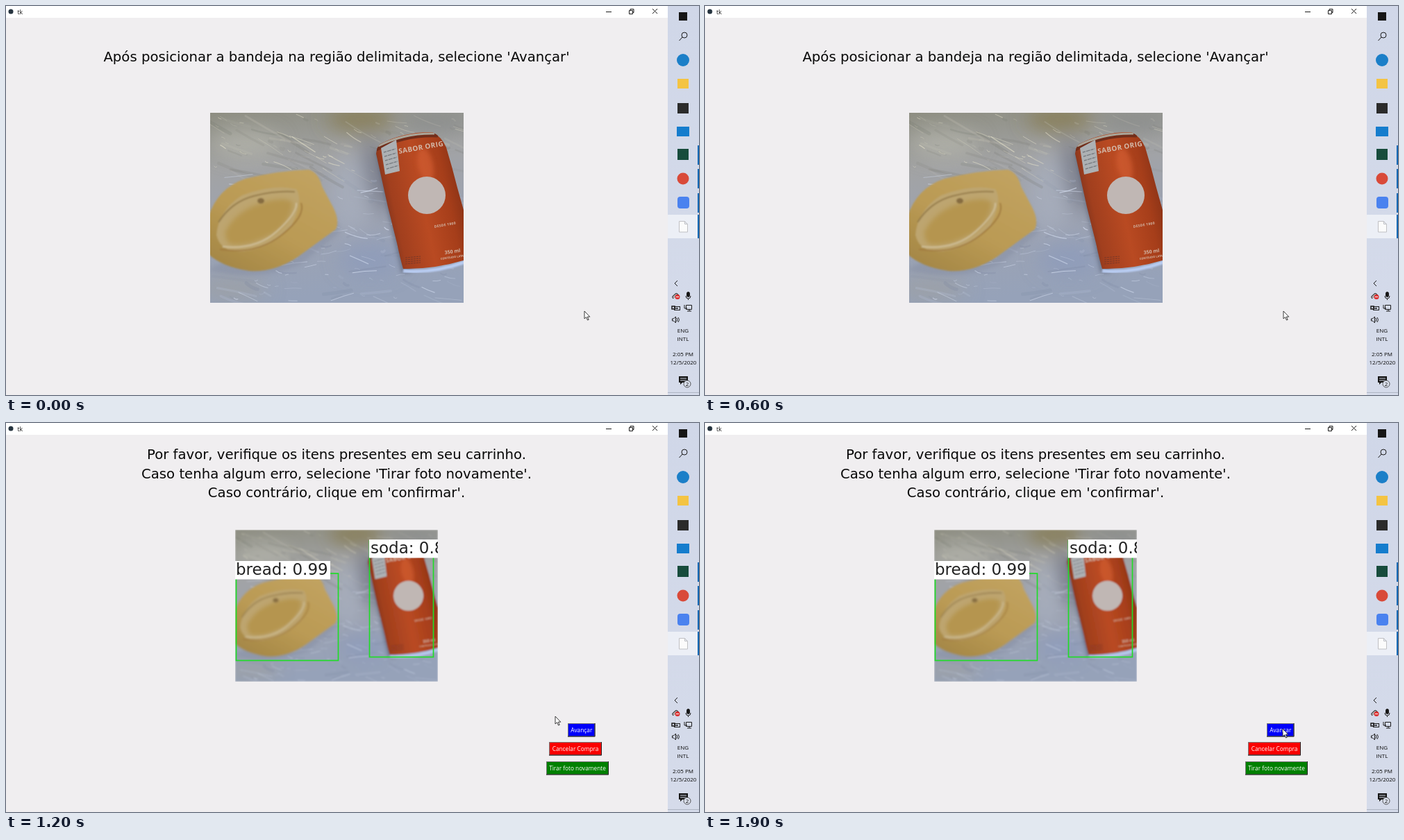
An HTML page for the animation above (2 s loop, 998 by 561 pixels).

```html
<!DOCTYPE html>
<html lang="pt">
<head>
<meta charset="utf-8">
<title>tk</title>
<style>
html, body { margin: 0; width: 100%; height: 100%; overflow: hidden; background: #f0eef0; }
svg { display: block; width: 998px; height: 561px; }
text { font-family: "Open Sans", sans-serif; }
.heading text { font: 19.7px "DejaVu Sans", sans-serif; text-anchor: middle; fill: #080808; }
.tag text { font: 23px "DejaVu Sans", sans-serif; fill: #222; }
.tray text { font-size: 8px; text-anchor: middle; fill: #080808; }
.button text { font-size: 8.3px; text-anchor: middle; fill: #fff; }
.can-print text { font-weight: 700; fill: #d3b8a8; }
.line { fill: none; stroke: #1b1b1b; stroke-width: 1; }
</style>
</head>
<body>
<svg viewBox="0 0 998 561">
  <defs>
    <linearGradient id="sheet" x2="0.15" y2="1">
      <stop offset="0" stop-color="#8e8e82"/>
      <stop offset=".3" stop-color="#a2a3a4"/>
      <stop offset=".62" stop-color="#9da3b2"/>
      <stop offset="1" stop-color="#96a2b9"/>
    </linearGradient>
    <linearGradient id="crust" x1="0" y1="1" x2=".7" y2="0">
      <stop offset="0" stop-color="#a08343"/>
      <stop offset=".5" stop-color="#ba9a54"/>
      <stop offset="1" stop-color="#c1a25f"/>
    </linearGradient>
    <linearGradient id="metal" gradientUnits="userSpaceOnUse" x1="540" y1="295" x2="660" y2="270">
      <stop offset="0" stop-color="#78301b"/>
      <stop offset=".16" stop-color="#a13f1e"/>
      <stop offset=".5" stop-color="#b94a22"/>
      <stop offset=".8" stop-color="#a63e1a"/>
      <stop offset="1" stop-color="#893216"/>
    </linearGradient>
    <linearGradient id="bar" x2="0" y2="1">
      <stop offset="0" stop-color="#d0d7e8"/>
      <stop offset="1" stop-color="#d5dbea"/>
    </linearGradient>
    <filter id="soft1"><feGaussianBlur stdDeviation="1"/></filter>
    <filter id="soft3" x="-50%" y="-50%" width="200%" height="200%"><feGaussianBlur stdDeviation="3"/></filter>
    <filter id="soft16" x="-50%" y="-50%" width="200%" height="200%"><feGaussianBlur stdDeviation="14"/></filter>
    <clipPath id="frame"><rect x="294" y="154" width="365" height="274"/></clipPath>
    <clipPath id="smallFrame"><rect x="330" y="154" width="292" height="219"/></clipPath>
    <path id="canShape" d="M533 213 Q534 203 539 199 Q574 181 614 182 Q627 188 634 204 Q643 234 650 262 L662 305 V366 Q615 380 572 379 Q568 366 563 342 L550 290Z"/>
    <clipPath id="canClip"><use href="#canShape"/></clipPath>

    <g id="photo" clip-path="url(#frame)">
      <rect x="294" y="154" width="365" height="274" fill="url(#sheet)"/>
      <g filter="url(#soft16)">
        <ellipse cx="345" cy="198" rx="50" ry="20" fill="#bdbcb2" opacity=".6"/>
        <ellipse cx="510" cy="163" rx="48" ry="17" fill="#837545" opacity=".7"/>
        <ellipse cx="620" cy="168" rx="50" ry="14" fill="#858889" opacity=".7"/>
        <ellipse cx="496" cy="270" rx="30" ry="55" fill="#a9afbf" opacity=".7"/>
        <ellipse cx="325" cy="408" rx="50" ry="18" fill="#9fa0a2" opacity=".7"/>
        <ellipse cx="525" cy="365" rx="45" ry="25" fill="#8a9abd" opacity=".6"/>
        <ellipse cx="534" cy="245" rx="16" ry="55" transform="rotate(-12 534 245)" fill="#6d7080" opacity=".8"/>
      </g>
      <g id="creases" fill="none" stroke-linecap="round"></g>

      <path d="M290 380 Q360 400 425 372 L482 325 470 300Z" fill="#858da2" opacity=".5" filter="url(#soft3)"/>
      <g filter="url(#soft1)">
        <path d="M291 305 Q305 262 345 249 Q395 237 436 236 Q450 240 455 260 L471 290 Q481 310 475 322 Q450 340 420 362 Q385 385 350 382 Q310 376 291 357Z" fill="url(#crust)"/>
        <path d="M303 330 Q306 295 340 273 Q385 256 418 264 Q429 280 411 317 Q384 349 342 354 Q309 356 303 330Z" fill="#bda56f"/>
        <path d="M316 325 Q330 297 365 285 Q403 273 413 284 Q412 306 390 325 Q350 348 325 344 Q315 341 316 325Z" fill="#b5954f" filter="url(#soft3)"/>
        <path d="M306 312 Q325 282 357 274 T416 268" fill="none" stroke="#947a4a" stroke-width="2"/>
        <path d="M312 347 Q360 352 390 325 T418 284" fill="none" stroke="#d0c09a" stroke-width="2"/>
        <path d="M308 351 Q360 359 396 331 T425 284" fill="none" stroke="#a27c3f" stroke-width="2"/>
        <ellipse cx="367" cy="281" rx="5" ry="4" fill="#866c40"/>
      </g>

      <path d="M532 210 L552 305 570 385 585 383 550 205Z" fill="#4f566c" opacity=".6" filter="url(#soft3)"/>
      <path d="M572 382 Q615 386 662 369" fill="none" stroke="#b9cdf3" stroke-width="5" filter="url(#soft1)"/>
      <use href="#canShape" fill="url(#metal)"/>
      <g clip-path="url(#canClip)" class="can-print">
        <ellipse cx="604" cy="229" rx="11" ry="25" transform="rotate(-12 604 229)" fill="#e0683a" opacity=".5" filter="url(#soft3)"/>
        <path d="M533 207 Q574 185 622 187" fill="none" stroke="#712e1b" stroke-width="5"/>
        <path d="M536 202 Q574 183 617 184" fill="none" stroke="#aaa69a" stroke-width="3"/>
        <path d="M540 205 L562 193 567 238 546 243Z" fill="#adb1b4"/>
        <g stroke="#777b80" stroke-width="1.4" stroke-dasharray="4 1 6 1">
          <path d="M544 211l17-5m-16 11l17-5m-16 11l17-5m-16 11l17-5m-16 11l17-5"/>
        </g>
        <text transform="translate(566 213) rotate(-10)" font-size="10" letter-spacing=".4">SABOR ORIG</text>
        <circle cx="606" cy="273" r="27" fill="#c0b7b4"/>
        <text transform="translate(617 320) rotate(-10)" font-size="5" letter-spacing=".3">DESDE 1900</text>
        <text transform="translate(632 358) rotate(-8)" font-size="7">350 ml</text>
        <text transform="translate(626 366) rotate(-8)" font-size="4">CONTEUDO LATA</text>
        <path d="M575 363l22-2m-22 5l22-2m-22 5l22-2m-22 5l22-2" stroke="#7c3827" stroke-dasharray="3 1"/>
      </g>
    </g>
  </defs>

  <rect width="998" height="561" fill="#f0eef0"/>
  <rect width="953" height="17" fill="#fff"/>
  <circle cx="7" cy="8" r="3.5" fill="#26343f"/>
  <text x="16.5" y="11.5" font-size="8.5" fill="#111">tk</text>
  <path class="line" d="M864 8.5h8M897.5 6.5h5v5h-5zM899 6V4.500h5v5h-1.500M931 4l7 7m0-7l-7 7"/>

  <g id="capture">
    <g class="heading"><text x="476" y="79.5">Após posicionar a bandeja na região delimitada, selecione 'Avançar'</text></g>
    <use href="#photo"/>
  </g>

  <g id="review" opacity="0">
    <g class="heading">
      <text x="476" y="52">Por favor, verifique os itens presentes em seu carrinho.</text>
      <text x="476" y="79.5">Caso tenha algum erro, selecione 'Tirar foto novamente'.</text>
      <text x="476" y="107">Caso contrário, clique em 'confirmar'.</text>
    </g>
    <g clip-path="url(#smallFrame)">
      <g filter="url(#soft1)"><use href="#photo" transform="translate(330 154) scale(.8) translate(-294 -154)"/></g>
      <g fill="none" stroke="#20dc28" stroke-width="1.7">
        <rect x="331.5" y="217" width="147" height="125.5"/>
        <rect x="523.5" y="170" width="92" height="167.5"/>
      </g>
      <g class="tag">
        <rect x="330" y="199" width="137" height="26.5" fill="#fff"/>
        <text x="331" y="219">bread: 0.99</text>
        <rect x="523" y="168" width="100" height="26.5" fill="#fff"/>
        <text x="525" y="188">soda: 0.88</text>
      </g>
    </g>
    <g id="buttons"></g>
  </g>

  <rect x="953" width="45" height="561" fill="url(#bar)"/>
  <rect x="953" y="301" width="45" height="34" fill="#eceff6"/>
  <path d="M997 201v28m0 6v28m0 7v28m0 3v34" stroke="#1468b4" stroke-width="2"/>
  <path d="M953 557.5h45" stroke="#aeb5c3"/>
  <rect x="969" y="9" width="12" height="12" fill="#161616"/>
  <g class="line"><circle cx="977" cy="42" r="4"/><path d="M974 45l-4.500 5"/></g>
  <circle cx="975" cy="78" r="9" fill="#1b7fc8"/>
  <rect x="967" y="105" width="16" height="14" fill="#f4c443"/>
  <rect x="967" y="140" width="16" height="15" fill="#2b2b2b"/>
  <rect x="966" y="174" width="18" height="14" fill="#157dcd"/>
  <rect x="967" y="206" width="16" height="16" fill="#174c3c"/>
  <circle cx="975" cy="249" r="8.5" fill="#d94a39"/>
  <rect x="967" y="275" width="17" height="17" rx="4" fill="#4a82ef"/>
  <path d="M969.5 310.5h8l4 4v11.500h-12zM977.5 310.5v4h4" fill="#fbfbfb" stroke="#bfc0c4"/>

  <g class="line">
    <path d="M967 396l-4 4 4 4"/>
    <path d="M961 422q-3-3 1-5q3-5 7 0" fill="#aaa"/>
    <circle cx="967" cy="419.5" r="3.5" fill="#dc3434" stroke="none"/>
    <path d="M965 419.5h4" stroke="#fff"/>
    <rect x="980.5" y="412.5" width="4" height="7" rx="2" fill="#151515"/>
    <path d="M979 418q0 4 3.500 4t3.500-4M982.5 422v2"/>
    <rect x="962.5" y="433.5" width="8" height="5"/><path d="M959 433h4v4h-4zM964 436h4" stroke-width="1.5"/>
    <path d="M979.5 431.5h8v6h-8zM984 437v3m-3 0h6M977 431v5h4"/>
    <path d="M959.5 451h2l3-3v9l-3-3h-2zM966 450q2 2.500 0 5M968 449q3 3.500 0 7"/>
  </g>
  <g class="tray">
    <text x="975" y="471">ENG</text>
    <text x="975" y="483">INTL</text>
    <text x="975" y="504.5">2:05 PM</text>
    <text x="975.5" y="517">12/5/2020</text>
    <path d="M969 534h13v9h-8l-3 3v-3h-2z" fill="#151515"/>
    <path d="M971 537h9m-9 3h9" stroke="#d5dbea"/>
    <circle cx="981" cy="545" r="5" fill="#dce1ed" stroke="#333" stroke-width=".8"/>
    <text x="981" y="548">2</text>
  </g>

  <path id="cursor" d="M0 0V11L2.600 8.700 4.500 13 6.200 12.300 4.300 8.200H7.800Z" fill="#fff" stroke="#282828" stroke-width=".9"/>
</svg>
<script>
const LOOP = 2000;
const REVIEW_START = 1000;
const byId = id => document.getElementById(id);

function add(parent, name, attrs, text = '') {
  const node = document.createElementNS(parent.namespaceURI, name);
  for (const key in attrs) node.setAttribute(key, attrs[key]);
  node.textContent = text;
  return parent.appendChild(node);
}

function addButton(label, x, y, width, fill) {
  const group = add(byId('buttons'), 'g', { class: 'button' });
  add(group, 'rect', { x: x + .5, y: y + .5, width: width - 1, height: 18.5, fill, stroke: '#777' });
  add(group, 'path', { d: `M${x} ${y + 19}h${width - .5}v-19`, fill: 'none', stroke: '#222' });
  add(group, 'text', { x: x + width / 2, y: y + 12.5 }, label);
}
addButton('Avançar', 809, 433, 39.5, '#0000fa');
addButton('Cancelar Compra', 782, 460, 76, '#fa0000');
addButton('Tirar foto novamente', 778, 488, 90, '#008000');

// Folds in the plastic sheet: wide dim ones first, thin glints on top.
let seed = 17;
const random = () => (seed = seed * 16807 % 2147483647) / 2147483647;
function addCreases(count, maxLength, maxWidth, maxOpacity, colors) {
  for (let i = 0; i < count; i++) {
    const upper = random() < .45;
    const x = 284 + random() * 365;
    const y = upper ? 156 + random() * 85 : 245 + random() * 180;
    const length = 4 + random() ** 2 * maxLength;
    const slope = upper ? .1 + random() * .6 : random() - .35;
    const bend = random() * 5 - 2;
    add(byId('creases'), 'path', {
      d: `M${x} ${y}q${length / 2} ${slope * length / 2 + bend} ${length} ${slope * length}`,
      stroke: colors[upper ? 0 : 1],
      'stroke-width': maxWidth * (.3 + random() * .7),
      opacity: maxOpacity * (.3 + random() * .7)
    });
  }
}
addCreases(60, 70, 5, .22, ['#6f7068', '#76819b']);
addCreases(60, 70, 4, .25, ['#c8c6b8', '#c0cbe2']);
addCreases(150, 36, 1.4, .65, ['#e3dfc9', '#dce5f7']);

function play(node, frames) {
  node.animate([...frames, { ...frames.at(-1), offset: 1 }],
    { duration: LOOP, iterations: Infinity });
}
const hold = (time, style) => ({ offset: time / LOOP, easing: 'step-end', ...style });

play(byId('capture'), [hold(0, { opacity: 1 }), hold(REVIEW_START, { opacity: 0 })]);
play(byId('review'), [hold(0, { opacity: 0 }), hold(REVIEW_START, { opacity: 1 })]);

const cursorSteps = [
  [0, 833, 440], [1000, 762, 423], [1100, 776, 423], [1200, 791, 423],
  [1300, 805, 424], [1400, 815, 424], [1500, 822, 429], [1600, 828, 435],
  [1700, 831, 439], [1800, 832, 441]
];
play(byId('cursor'), cursorSteps.map(([time, x, y]) =>
  hold(time, { transform: `translate(${x}px, ${y}px)` })));
</script>
</body>
</html>
```
